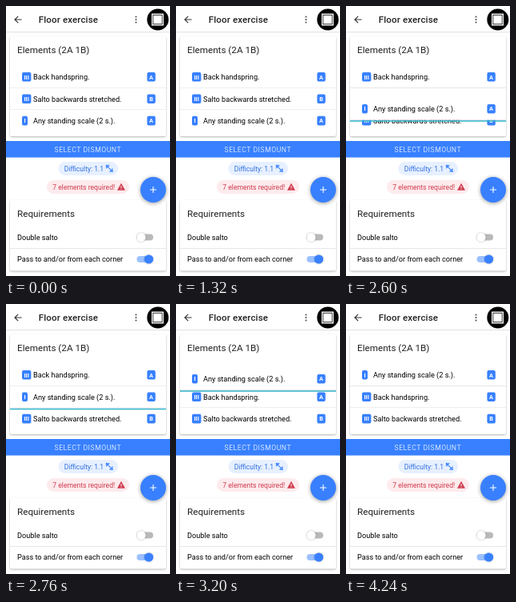
Write an HTML page that moves like this. It is 205 px wide and 338 px high and loops after 5.68 s.

```html
<!DOCTYPE html>
<html lang="en">
<head>
<meta charset="utf-8">
<title>Floor exercise</title>
<style>
  html, body { margin: 0; width: 100%; height: 100%; overflow: hidden; background: #fff; }
  svg { display: block; width: 205px; height: 338px; font: 9.16px Roboto, sans-serif; }
  .shadow { filter: drop-shadow(0 .8px 1px rgba(0, 0, 0, .3)); }
  .card { fill: #fff; filter: drop-shadow(0 1px 1.2px rgba(0, 0, 0, .3)); }
  .head { font-size: 11.7px; fill: #222; }
  .badge { font-size: 7.4px; font-weight: 700; fill: #fff; text-anchor: middle; }
  .blue { fill: #3880ff; }
  .rule { fill: #d8d8d8; }
</style>
</head>
<body>
<svg viewBox="0 0 205 338">
  <defs><clipPath id="list"><rect x="4" y="70" width="198" height="87"/></clipPath></defs>

  <!-- toolbar -->
  <rect width="205" height="32" fill="#fff" class="shadow"/>
  <path d="M19.6 17H11.2M15.2 12.8L11 17l4.2 4.2" fill="none" stroke="#333" stroke-width="1.2"/>
  <text x="40.8" y="21" font-size="11.5" font-weight="500" letter-spacing=".14" fill="#222">Floor exercise</text>
  <g fill="#444"><circle cx="162.5" cy="13.6" r="1"/><circle cx="162.5" cy="17" r="1"/><circle cx="162.5" cy="20.4" r="1"/></g>
  <circle cx="189.8" cy="17" r="13.5"/>
  <rect x="182" y="9.5" width="15" height="15" fill="#fff"/>
  <rect x="183.8" y="11.3" width="11.4" height="11.4" fill="none" stroke="#222" stroke-width=".9"/>

  <!-- element list -->
  <rect class="card" x="5" y="38" width="195" height="125" rx="2"/>
  <text class="head" x="14" y="59">Elements (2A 1B)</text>
  <g id="rows" clip-path="url(#list)"></g>

  <rect class="blue" y="169" width="205" height="20.6"/>
  <text x="102.3" y="182.7" font-size="8.7" letter-spacing=".5" fill="#d3e3ff" text-anchor="middle">SELECT DISMOUNT</text>

  <!-- chips -->
  <rect x="65.5" y="195" width="74.5" height="17" rx="8.5" fill="#e7f0ff"/>
  <text x="72.8" y="206.5" font-size="8.6" fill="#3171e0">Difficulty: 1.1</text>
  <g transform="translate(129.3 203.4) rotate(45)" class="blue">
    <rect x="-6" y="-.5" width="12" height="1"/>
    <rect x="-5.2" y="-1.6" width="1.1" height="3.2"/><rect x="-3.8" y="-2.8" width="1.3" height="5.6"/>
    <rect x="4.1" y="-1.6" width="1.1" height="3.2"/><rect x="2.5" y="-2.8" width="1.3" height="5.6"/>
  </g>
  <rect x="51" y="218" width="103" height="17" rx="8.5" fill="#fdebed"/>
  <text x="58.3" y="229.5" font-size="8.6" fill="#cf3c4f">7 elements required!</text>
  <path d="M144 221.8l5 9h-10z" fill="#cf3c4f"/>
  <path d="M144 225v3M144 228.7v1" stroke="#fff" stroke-width=".9"/>

  <!-- requirements -->
  <rect class="card" x="5" y="243" width="195" height="88.5" rx="2"/>
  <text class="head" x="14" y="264">Requirements</text>
  <text x="14" y="292.7">Double salto</text>
  <text x="14" y="320.4">Pass to and/or from each corner</text>
  <rect class="rule" x="5" y="303" width="195" height=".6"/>
  <rect x="163.5" y="285.5" width="20.5" height="8" rx="4" fill="#b9b9b9"/>
  <circle class="shadow" cx="169" cy="289.5" r="5.6" fill="#fff"/>
  <rect x="163.5" y="313" width="20.5" height="8" rx="4" fill="#9bc0ff"/>
  <circle class="blue shadow" cx="178.5" cy="317" r="5.6"/>

  <circle class="blue" cx="184" cy="230" r="16" style="filter:drop-shadow(0 1.8px 2.6px rgba(0,0,0,.4))"/>
  <path d="M184 226v8M180 230h8" stroke="#fff" stroke-width="1.1"/>
</svg>
<script>
const LOOP = 5680, PITCH = 27.4, FIRST = 89;
// [time, centre] of the row being dragged
const DRAG = [[2280, 143.8], [2320, 140.5], [2600, 129], [2880, 107.2], [2960, 104],
              [3200, 94], [3480, 91], [3920, 90], [4000, FIRST]];
const rows = document.getElementById('rows');

const clamp = v => Math.min(1, Math.max(0, v));
const phase = (t, start, length) => clamp((t - start) / length);
const ease = p => p * p * (3 - 2 * p);

function along(keys, t) {
  if (t <= keys[0][0]) return keys[0][1];
  for (let i = 1; i < keys.length; i++) {
    const [t0, a] = keys[i - 1], [t1, b] = keys[i];
    if (t < t1) return a + (b - a) * (t - t0) / (t1 - t0);
  }
  return keys[keys.length - 1][1];
}

const badge = (x, width, label) =>
  `<rect class="blue" x="${x}" y="-6" width="${width}" height="11.6" rx="2"/>
   <text class="badge" x="${x + width / 2}" y="2.5">${label}</text>`;

function addRow(group, groupWidth, label, grade) {
  const row = document.createElementNS('http://www.w3.org/2000/svg', 'g');
  row.innerHTML = `<rect x="5" y="-13.7" width="195" height="27.4" fill="#fff"/>
    <rect class="rule" x="5" y="13.2" width="195" height=".6"/>
    ${badge(20, groupWidth, group)}<text x="34" y="3.4">${label}</text>${badge(176.4, 10.4, grade)}`;
  return rows.appendChild(row);
}

const hand = addRow('III', 11.4, 'Back handspring.', 'A');
const salto = addRow('III', 11.4, 'Salto backwards stretched.', 'B');
const scale = addRow('I', 7, 'Any standing scale (2 s.).', 'A');
scale.insertAdjacentHTML('beforeend', '<rect x="5" y="14.3" width="195" height="1.5" fill="#2fb3cb"/>');
const line = scale.lastElementChild;

const place = (row, y) => row.setAttribute('transform', `translate(0 ${y})`);

function draw(now) {
  const t = now % LOOP;
  place(hand, FIRST + PITCH * ease(phase(t, 2960, 220)));
  place(salto, FIRST + PITCH * (1 + ease(phase(t, 2360, 220))));
  place(scale, along(DRAG, t));
  line.setAttribute('opacity', t < 2320 ? 0 : 1 - phase(t, 3720, 280));
  requestAnimationFrame(draw);
}
draw(performance.now());
</script>
</body>
</html>
```
